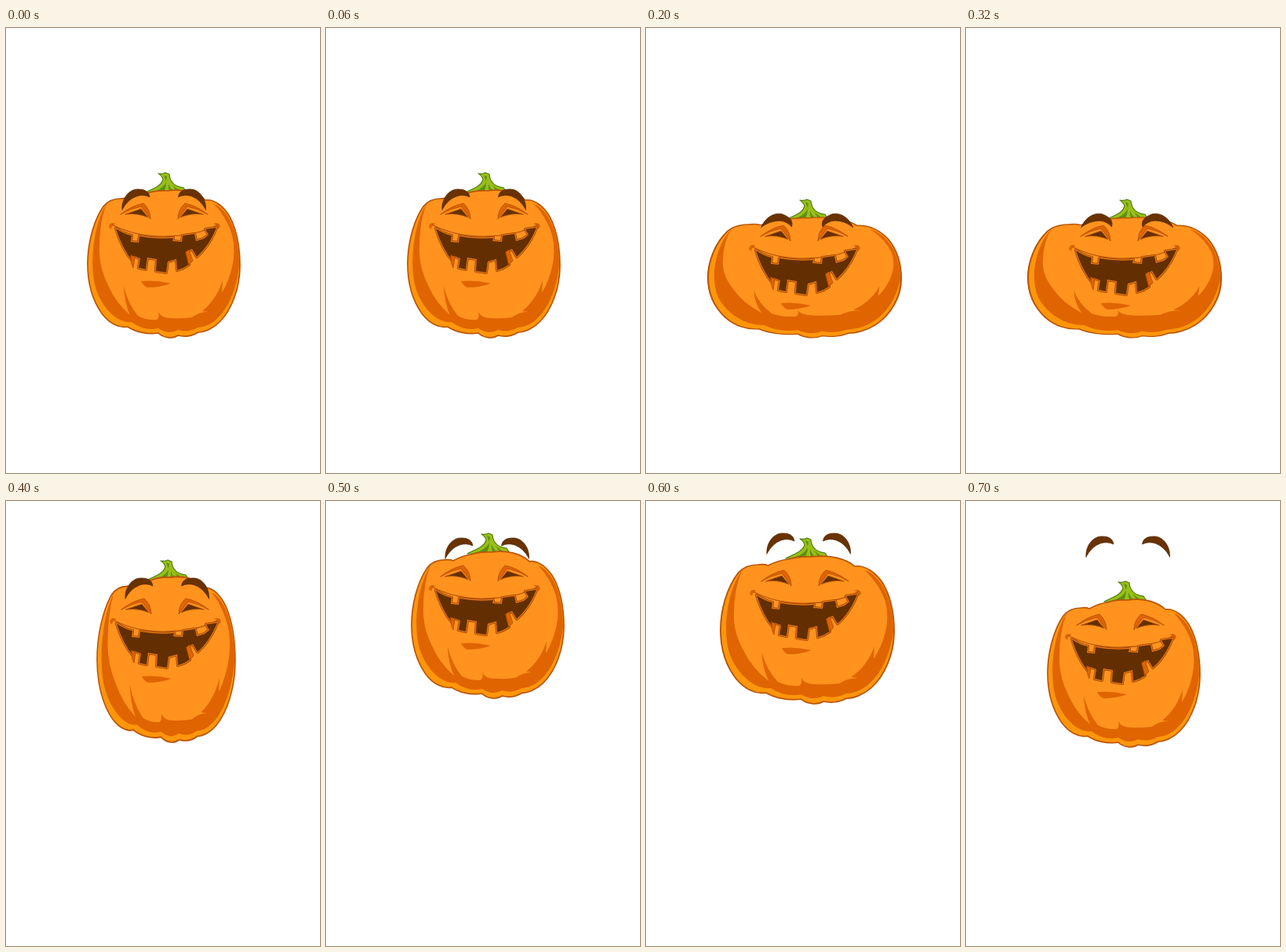
An HTML page for the animation above (0.8 s loop, 400 by 566 pixels).

```html
<!DOCTYPE html>
<html lang="en">
<head>
<meta charset="utf-8">
<title>Bouncing pumpkin</title>
<style>
  html, body { margin: 0; width: 100%; height: 100%; overflow: hidden; background: #fff; }
  svg { display: block; width: 100%; height: 100%; }
  path { stroke-linejoin: round; stroke-linecap: round; }
  .line { fill: none; stroke: #b9550a; stroke-width: 1.7; vector-effect: non-scaling-stroke; }
  .shade { fill: #e06400; }
  .skin { fill: #ff931e; }
  .dark { fill: #632f00; }
  .edge { stroke: #b04c00; stroke-width: .8; }
</style>
</head>
<body>
<svg viewBox="0 0 400 566">
  <defs>
    <path id="shell" d="M155 380 C143 382 131 375 122 363 C110 346 104 325 104 300 C104 275 111 246 124 227 Q132 217 146 217 Q153 216 157 218 Q170 211 180 210 Q192 206 206 207 C225 204 244 209 254 219 C266 217 278 228 285 240 C294 257 298 280 298 302 C298 330 288 358 272 374 C263 383 252 387 245 387 C237 392 227 393 219 391 C212 396 200 394 194 388 C181 390 165 387 155 380Z"/>
    <path id="mouth" d="M140 255 Q150 262 160 264 L159 272 L169 273 L170 265 Q191 269 213 267 L212 271 L224 272 L225 264 L240 262 L242 271 L252 268 L258 263 L254 256 L268 254 Q259 277 243 291 L237 281 L229 285 L233 301 Q226 306 218 308 L217 294 L206 297 L204 311 L191 309 L192 294 L180 292 L178 307 L169 305 L171 293 L163 290 L161 296 Q148 281 140 255Z"/>
    <g id="eye">
      <path class="shade edge" d="M146 237 Q160 226 175 223 Q184 231 184 243 L172 227 Q158 230 146 237Z"/>
      <path class="dark edge" d="M152 237 L172 230 L181 241 Q168 235 152 237Z"/>
    </g>
    <path id="brow" d="M153 71 C152 58 161 45 173 45 C182 45 187 48 188 55 Q180 51 171 54 Q160 58 153 71Z" fill="#693200" stroke="#522500" stroke-width=".7"/>
  </defs>
  <g id="stem">
    <path d="M176 210 C187 204 197 202 200 193 Q199 188 194 185 Q200 186 203 184 L208 186 C209 197 216 202 226 203 L232 212Z" fill="#9abf16" stroke="#4f7d18" stroke-width="1.2"/>
    <path d="M185 209 Q200 205 204 196 Q204 205 199 210Z M207 198 Q209 204 215 210 L210 211 Q206 205 207 198Z M212 200 L224 209 L219 210Z M201 187 L205 189 L204 195Z" fill="#5f8f16"/>
  </g>
  <g id="body">
    <use href="#shell" fill="#ff960a"/>
    <path class="shade" d="M128 224 C111 250 106 302 114 330 C122 356 142 376 160 374 Q176 386 194 382 Q207 391 219 384 Q232 388 244 381 C273 380 293 342 297 302 C297 267 287 236 268 225Z"/>
    <path id="skin" class="skin" d="M128 224 Q136 217 156 219.500 Q170 212 180 211 Q192 208 206 208.500 C225 206 243 211 254 220.500 L267 226 Q282 243 288 263 Q293 283 288 304 Q284 322 275 337 L276 321 Q268 346 250 360 L258 361 Q246 361 237 368 Q224 370 209 369 Q198 369 194 361 Q196 368 192 371 Q178 372 168 366 Q155 350 150 328 Q151 350 158 365 Q140 350 130 327 Q120 307 119 287 Q118 250 128 224Z"/>
    <use href="#shell" class="line"/>
  </g>
  <g id="face">
    <use href="#eye"/>
    <use href="#eye" transform="matrix(-1 0 0 1 403 0)"/>
    <path class="shade" d="M131 253 Q132 246 140 249 Q135 250 134 256Z M273 253 Q272 246 264 249 Q269 250 270 256Z"/>
    <path class="line" style="stroke-width:1.300" d="M135 250 Q165 266 205 265 Q245 264 270 250"/>
    <use href="#mouth" fill="none" stroke="#9c4300" stroke-width="4"/>
    <use href="#mouth" fill="none" stroke="#e77714" stroke-width="2.4"/>
    <use href="#mouth" class="dark"/>
    <path class="shade edge" d="M229 285 L233 282 L238 296 L233 301Z M159 289 L164 291 L162 305 L160 300Z"/>
    <path class="shade" d="M172 322 Q191 320 210 325 Q196 330 180 330 Q175 328 172 322Z"/>
  </g>
  <g id="browL"><use href="#brow"/></g>
  <g id="browR"><use href="#brow" transform="matrix(-1 0 0 1 412.5 0)"/></g>
</svg>
<script>
  const LOOP = 800;
  const REST = { left: 104, width: 194, top: 205, height: 189 };

  // body: left, right, top, bottom; stem and face: x, y offsets; brow: x, y, tilt
  const poses = [
    { at: 0,   body: [104, 298, 205, 394], stem: [0, 0],    face: [0, 0],    brow: [-5, 160, 0] },
    { at: 100, body: [91, 311, 219, 394],  stem: [0, 13],   face: [0, 11],   brow: [-1, 172, 30] },
    { at: 200, body: [79, 325, 240, 394],  stem: [2, 34],   face: [0, 28],   brow: [-1, 191, 24] },
    { at: 400, body: [116, 292, 95, 307],  stem: [3, -109], face: [1, -99],  brow: [-1, 53, 0] },
    { at: 500, body: [109, 303, 63, 251],  stem: [4, -143], face: [0, -141], brow: [-1, 2, 0] },
    { at: 600, body: [95, 316, 69, 258],   stem: [2, -137], face: [1, -135], brow: [1, -4, 0] },
    { at: 700, body: [104, 298, 124, 313], stem: [0, -82],  face: [-5, -79], brow: [0, 0, 0] }
  ];

  const place = (id, transform) => document.getElementById(id).setAttribute("transform", transform);
  const shift = ([x, y]) => `translate(${x} ${y})`;

  function fitBody([left, right, top, bottom]) {
    const sx = (right - left) / REST.width;
    const sy = (bottom - top) / REST.height;
    place("body", `matrix(${sx} 0 0 ${sy} ${left - REST.left * sx} ${top - REST.top * sy})`);

    // Squashing the body thickens the shadow along its base.
    const lit = Math.min(1, 0.67 + 0.33 * sy);
    place("skin", `matrix(1 0 0 ${lit} 0 ${REST.top * (1 - lit)})`);
  }

  function render(time) {
    const { body, stem, face, brow } = poses.findLast(pose => pose.at <= time % LOOP);
    const tilt = brow[2];
    fitBody(body);
    place("stem", shift(stem));
    place("face", shift(face));
    place("browL", `${shift(brow)} rotate(${tilt} 171 55)`);
    place("browR", `${shift(brow)} rotate(${-tilt} 241.5 55)`);
  }

  const start = performance.now();
  function tick() {
    render(performance.now() - start);
    requestAnimationFrame(tick);
  }
  tick();
</script>
</body>
</html>
```
